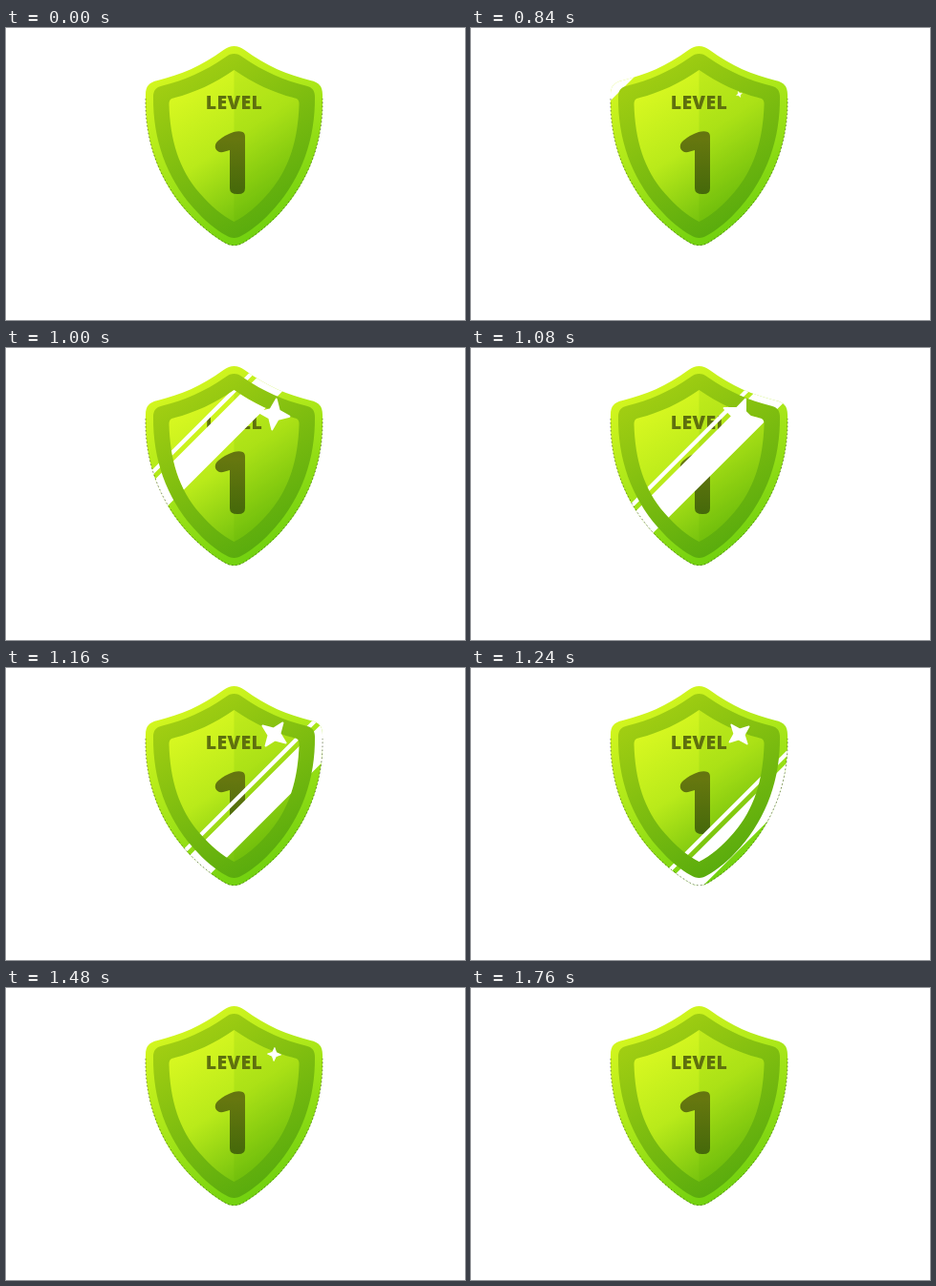
Recreate the animation shown at these times as an HTML page. Size 480 by 306 pixels, loop 1.88 s.

```html
<!DOCTYPE html>
<html lang="en">
<head>
<meta charset="utf-8">
<title>Level badge</title>
<style>
  html, body { margin: 0; width: 100%; height: 100%; overflow: hidden; background: #fff; }
  svg { display: block; width: 100%; height: 100%; }
  .label { font: 800 19.5px "Open Sans", "Noto Sans", sans-serif; letter-spacing: .4px; }
</style>
</head>
<body>
<svg viewBox="0 0 480 306" role="img" aria-label="Level 1">
  <defs>
    <linearGradient id="rimFill" gradientUnits="userSpaceOnUse" x1="185" y1="30" x2="285" y2="210">
      <stop offset="0" stop-color="#d6f71f"/>
      <stop offset=".5" stop-color="#a5e518"/>
      <stop offset="1" stop-color="#6fd00f"/>
    </linearGradient>
    <linearGradient id="ringFill" gradientUnits="userSpaceOnUse" x1="185" y1="40" x2="285" y2="200">
      <stop offset="0" stop-color="#a3cf12"/>
      <stop offset="1" stop-color="#58ab0d"/>
    </linearGradient>
    <linearGradient id="coreFill" gradientUnits="userSpaceOnUse" x1="190" y1="55" x2="278" y2="185">
      <stop offset="0" stop-color="#daf921"/>
      <stop offset=".5" stop-color="#b9ea1a"/>
      <stop offset="1" stop-color="#70bf0d"/>
    </linearGradient>
    <linearGradient id="ink" gradientUnits="userSpaceOnUse" x1="0" y1="70" x2="0" y2="174">
      <stop offset="0" stop-color="#5d6f0e"/>
      <stop offset=".45" stop-color="#66770f"/>
      <stop offset="1" stop-color="#45690a"/>
    </linearGradient>
    <clipPath id="rimClip"><path data-shape="rim"/></clipPath>
    <clipPath id="coreClip"><path data-shape="core"/></clipPath>
    <!-- Diagonal stripes, placed by their leading edge on the x axis -->
    <path id="stripes" fill="#fff" d="M0 0L-306 306H-347L-41 0ZM-48 0L-354 306H-360L-54 0Z"/>
  </defs>

  <path data-shape="rim" fill="url(#rimFill)"/>
  <g clip-path="url(#rimClip)"><use class="shine" href="#stripes"/></g>
  <path data-shape="ring" fill="url(#ringFill)"/>

  <g clip-path="url(#coreClip)">
    <rect x="160" y="40" width="160" height="170" fill="url(#coreFill)"/>
    <rect x="238.5" y="40" width="80" height="170" fill="#55a800" opacity=".14"/>
    <text class="label" x="238.5" y="84.8" text-anchor="middle" fill="url(#ink)">LEVEL</text>
    <path fill="url(#ink)" d="M238 109Q244 107.5 247.5 109Q250 110 250 114V168Q250 174 243 174Q234 174.5 234 168V128L227 130Q221 131 219 126Q218 121 222 118Q229 112 238 109Z"/>
    <use class="shine" href="#stripes"/>
  </g>

  <path d="M146 74C145 118 160 160 191 194C205 209 219 219 228 224.5Q238.5 231 249 224.5C258 219 272 209 286 194C317 160 332 118 331 74"
        fill="none" stroke="#26340c" stroke-width=".8" stroke-dasharray="1.5 2.5" opacity=".7"/>
  <path id="star" fill="#fff" stroke="#fff" stroke-width=".12" stroke-linejoin="round"/>
</svg>
<script>
  const LOOP = 1880, STEP = 40, START = 840, SHINE_END = 1360, STAR_END = 1760, MID = 238.5;

  // Right half of each outline as cubic points, x measured from the centre line
  const halves = {
    rim: [0,19, 4,19, 7,20.5, 11,23, 34,40, 56,49, 80,55, 89,57, 92.5,61, 92.5,70,
          94,118, 79,160, 48,194, 34,209, 20,219, 11,224.5, 7,227, 4,228, 0,228],
    ring: [0,27, 3,27, 6,28, 9,30.5, 31,46, 53,55, 75,60.5, 82,62, 84.5,66, 84.5,72,
           85,116, 71,156, 43,188, 30,203, 18,212, 9,217, 6,219, 3,220, 0,220],
    core: [0,44, 20,58, 42,68, 62,73, 66,74, 68,75, 68,80,
           67,116, 58,148, 36,173, 24,187, 12,197, 0,203]
  };

  function shieldPath(half) {
    const right = [], left = [];
    for (let i = 0; i < half.length; i += 2) {
      right.push(`${MID + half[i]} ${half[i + 1]}`);
      left.unshift(`${MID - half[i]} ${half[i + 1]}`);
    }
    return `M${right[0]}C${right.slice(1).concat(left.slice(1)).join(" ")}Z`;
  }

  function starPath(points, waist) {
    const corners = [];
    for (let i = 0; i < points * 2; i++) {
      const a = i * Math.PI / points, r = i % 2 ? waist : .94;
      corners.push(`${r * Math.sin(a)} ${-r * Math.cos(a)}`);
    }
    return `M${corners.join("L")}Z`;
  }

  for (const el of document.querySelectorAll("[data-shape]"))
    el.setAttribute("d", shieldPath(halves[el.dataset.shape]));

  const star = document.getElementById("star");
  const shines = document.querySelectorAll(".shine");
  star.setAttribute("d", starPath(4, .38));

  function show(el, on, transform) {
    el.setAttribute("visibility", on ? "visible" : "hidden");
    if (on) el.setAttribute("transform", transform);
  }

  function draw(now) {
    const t = Math.floor(now % LOOP / STEP) * STEP;
    const u = (t - START) / 160;
    const edge = 222 + 121 * u - 8.6 * u * u;
    for (const el of shines)
      show(el, t >= START && t < SHINE_END, `translate(${edge} 0)`);

    const size = Math.min((t - 800) * .085, (STAR_END - t) * .0267);
    const turn = 8 + (t - 1000) * .178;
    show(star, size > 0, `translate(280.5 69.5) rotate(${turn}) scale(${size})`);
  }

  const origin = performance.now();
  function tick() {
    draw(performance.now() - origin);
    requestAnimationFrame(tick);
  }
  tick();
</script>
</body>
</html>
```
